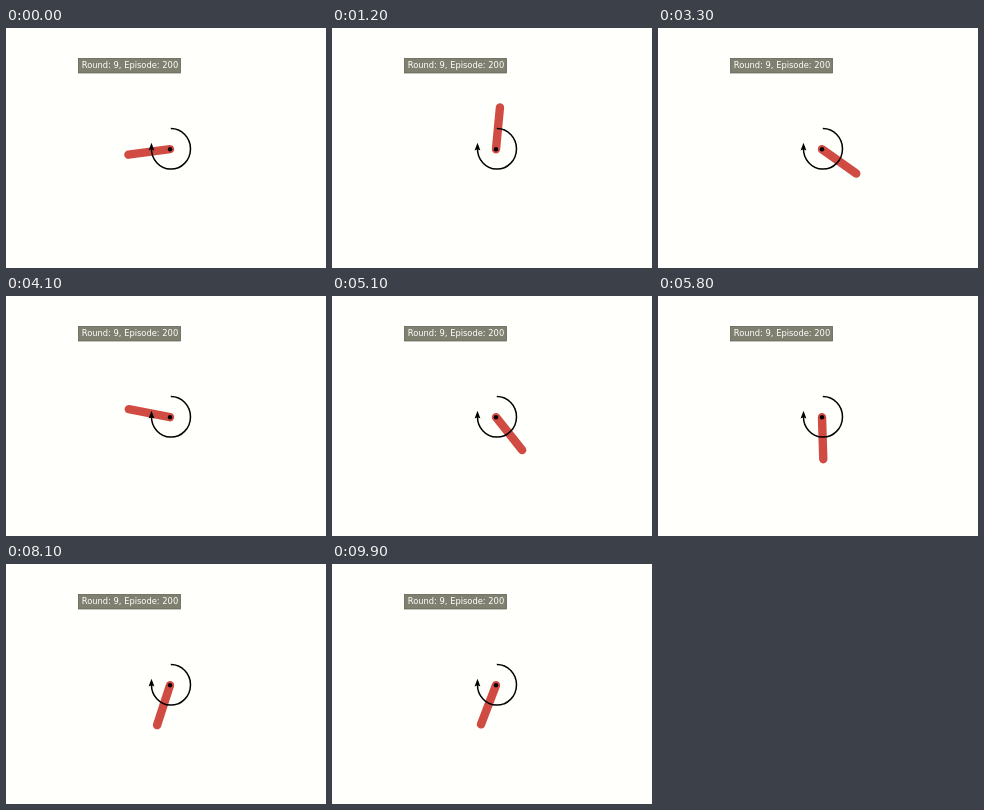
An HTML page that plays this animation: 320 by 240 pixels, repeating every 10 s.

```html
<!DOCTYPE html>
<html lang="en">
<head>
<meta charset="utf-8">
<title>Pendulum</title>
<style>
  html, body { margin: 0; width: 100%; height: 100%; overflow: hidden; background: #fffffc; }
  svg { display: block; width: 320px; height: 240px; }
  text { font: 8.33px "DejaVu Sans", sans-serif; fill: #fff; text-anchor: middle; }
</style>
</head>
<body>
<svg viewBox="0 0 320 240">
  <rect x="72.4" y="30.4" width="102.2" height="14.6" fill="#808070" stroke="#5c5c50" stroke-width=".7"/>
  <text x="124" y="40">Round: 9, Episode: 200</text>
  <g transform="translate(164 121.2)">
    <line id="rod" y2="42" stroke="#d04b42" stroke-width="8.4" stroke-linecap="round"/>
    <circle r="2.2"/>
  </g>
  <path d="M164.8 100.5A19.5 20.3 0 1 1 145.5 120" fill="none" stroke="#000" stroke-width="1.5"/>
  <path d="M145.5 114.8L148.4 122.6L145.5 121.2L142.6 122.6Z"/>
</svg>
<script>
const LOOP = 10000, STEP = 100;
const FIRST = 442.5; // clockwise degrees from hanging straight down

// Each swing runs to a turning point; skew above 1 starts it slowly, below 1 quickly.
const swings = [
  { end: 1400, to: 172, skew: 1 },
  { end: 3200, to: -56, skew: 1.83 },
  { end: 4250, to: 113, skew: 1.22 },
  { end: 5060, to: -41, skew: 1 },
  { end: 7200, to: 23, skew: 0.525 },
  { end: 7900, to: 17, skew: 1 },
  { end: 8600, to: 22, skew: 1 },
  { end: LOOP, to: 21, skew: 1 }
];

function angle(ms) {
  const i = swings.findIndex(s => ms < s.end);
  const { end, to, skew } = swings[i];
  const { end: begin, to: from } = swings[i - 1] || { end: 0, to: FIRST };
  const u = ((ms - begin) / (end - begin)) ** skew;
  return from + (to - from) * (1 - Math.cos(Math.PI * u)) / 2;
}

const rod = document.getElementById("rod");
const start = performance.now();

function draw() {
  const t = (performance.now() - start) % LOOP;
  rod.setAttribute("transform", `rotate(${angle(Math.floor(t / STEP) * STEP)})`);
  requestAnimationFrame(draw);
}
draw();
</script>
</body>
</html>
```
